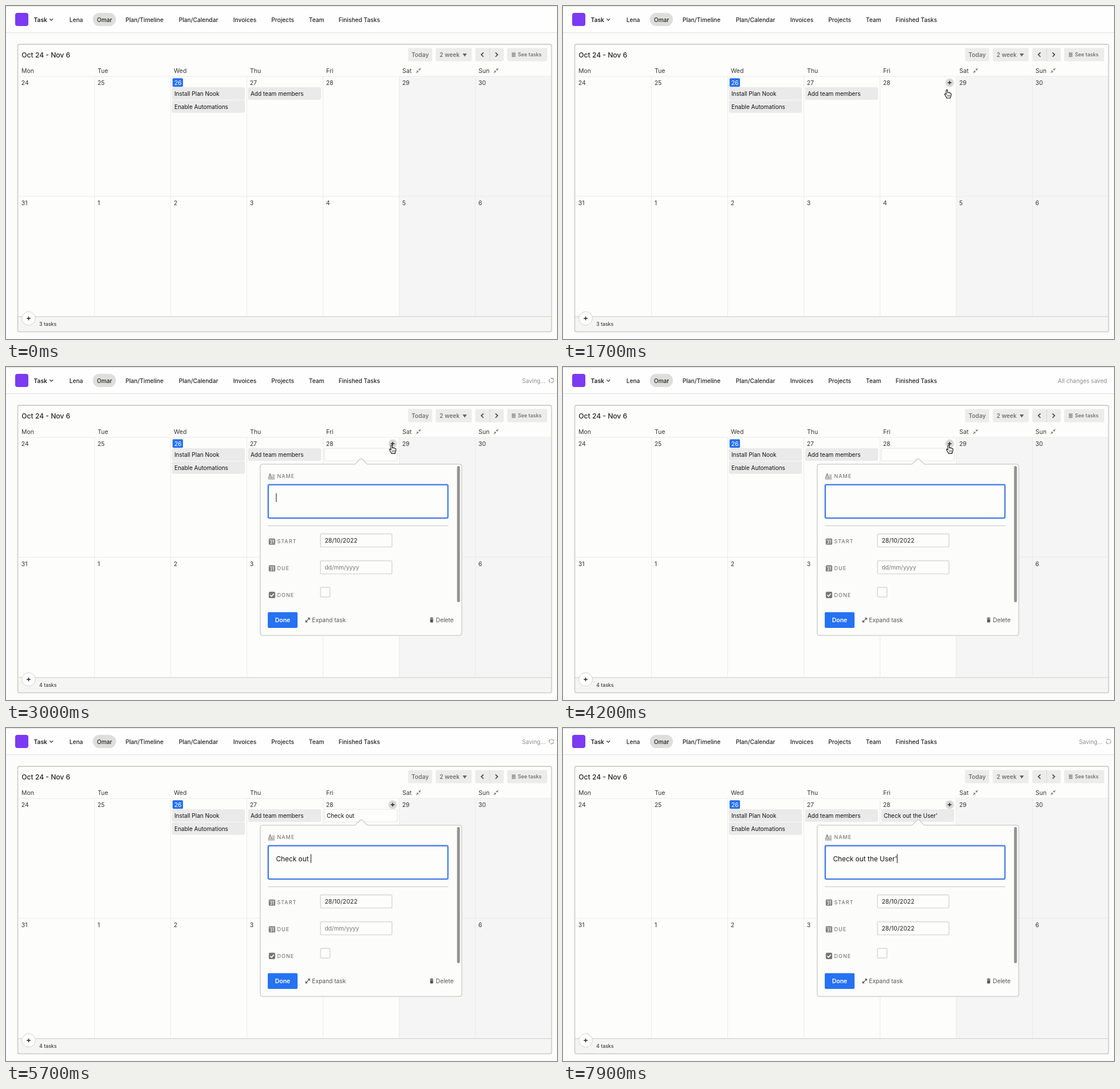
Write an HTML page that moves like this. It is 962 px wide and 582 px high and loops after 8000 ms.

```html
<!DOCTYPE html>
<html lang="en">
<head>
<meta charset="utf-8">
<title>Task calendar</title>
<style>
html, body { margin: 0; width: 100%; height: 100%; overflow: hidden; background: #fcfcfb; }
svg { display: block; width: 962px; height: 582px; }
text { font-family: Inter, "Open Sans", sans-serif; white-space: pre; }
</style>
</head>
<body>
<svg id="stage" viewBox="0 0 962 582" xmlns="http://www.w3.org/2000/svg"></svg>
<script>
const NS = 'http://www.w3.org/2000/svg';
const stage = document.getElementById('stage');
let layer = stage;

function add(tag, attrs, parent = layer) {
  const el = document.createElementNS(NS, tag);
  for (const k in attrs) el.setAttribute(k, attrs[k]);
  parent.appendChild(el);
  return el;
}
function group(attrs = {}) {
  layer = add('g', attrs, stage);
  return layer;
}
function box(x, y, w, h, fill, r = 0, stroke = 'none', sw = 1) {
  return add('rect', { x, y, width: w, height: h, rx: r, fill, stroke, 'stroke-width': sw });
}
function label(x, y, str, size, fill = '#222', weight = 400, more = {}) {
  const el = add('text', { x, y, 'font-size': size, fill, 'font-weight': weight, ...more });
  el.textContent = str;
  return el;
}
const mid = (x, y, str, size, fill, weight) =>
  label(x, y, str, size, fill, weight, { 'text-anchor': 'middle' });
function line(d, stroke, sw = 1) {
  return add('path', { d, stroke, 'stroke-width': sw, fill: 'none' });
}
function plus(x, y, r = 3.3) {
  line(`M${x - r} ${y}h${2 * r}M${x} ${y - r}v${2 * r}`, '#222', 1.4);
}
// Two arrow heads on a diagonal: pointing inward or outward
function diagonal(x, y, s, color, inward) {
  const g = add('g', { transform: `translate(${x} ${y})`, stroke: color, 'stroke-width': 1.1, fill: color });
  add('path', { d: `M${-s} ${s}L${s} ${-s}`, 'stroke-dasharray': inward ? `${s} ${s * 0.83} ${s}` : 'none' }, g);
  const a = inward ? 0.7 : s, b = inward ? s * 0.85 : s * 0.1;
  add('path', { d: `M${a} ${-a}L${a} ${-b}L${b} ${-a}ZM${-a} ${a}L${-a} ${b}L${-b} ${a}Z`, 'stroke-width': 0.5 }, g);
}

function drawNav() {
  box(0, 0, 962, 46, '#fefefe');
  line('M0 .5H962', '#dadada');
  line('M0 46.5H962', '#dfe1e7');
  box(16, 12, 23, 23, '#7c3af2', 4);
  label(48.6, 27.7, 'Task', 10.2, '#222', 600);
  line('M76.3 22.3l2.9 2.8 2.9-2.8', '#333', 1.2);
  box(151.5, 12, 40.5, 23, '#dededc', 11.5);
  [['Lena', 122.5], ['Omar', 172], ['Plan/Timeline', 241.8], ['Plan/Calendar', 336],
   ['Invoices', 417], ['Projects', 483.2], ['Team', 542.2], ['Finished Tasks', 616.8]]
    .forEach(([s, x]) => mid(x, 27.7, s, 10.2, '#222', 500));
}

const colX = i => 21.5 + 133 * i;
const ROWS = [123, 332.5, 542.5];

function item(col, row, str) {
  const x = colX(col) + 2.2, y = 142 + 22.7 * row;
  const bg = box(x, y, 127.5, 22, '#eaeaea', 3);
  return { bg, text: label(x + 4.2, y + 15.3, str, 10, '#111') };
}

function drawCalendar() {
  box(21, 67.5, 931, 502, '#fdfdfc', 3);
  box(686.5, 123, 265, 420, '#f5f5f5');
  box(21, 543, 931, 26, '#f5f5f4');
  label(27.3, 89.8, 'Oct 24 - Nov 6', 12.1, '#222', 500);

  box(702, 73.5, 42, 23, '#ececeb', 2);
  mid(723, 89, 'Today', 10.3, '#666', 500);
  box(750.5, 73.5, 62.5, 23, '#ececeb', 2);
  label(757, 89, '2 week', 10.2, '#666', 500);
  add('path', { d: 'M797.2 83h7.4l-3.7 5.5z', fill: '#666' });
  box(819.5, 73.5, 49.5, 23, '#ececeb', 2);
  line('M844.5 73.5v23', '#dadada');
  line('M833.6 81.4l-3.8 3.7 3.8 3.7M854.6 81.4l3.8 3.7-3.8 3.7', '#444', 1.6);
  box(875, 73.5, 70, 23, '#ececeb', 2);
  line('M883 82h6.6M883 84.1h6.6M883 86.2h6.6M883 88.3h6.6', '#666', 1.1);
  label(893.8, 88.4, 'See tasks', 8.9, '#666', 500);

  let grid = '';
  for (let i = 1; i < 7; i++) grid += `M${colX(i)} 123V542`;
  line(grid + ROWS.slice(0, 2).map(y => `M21 ${y}H952`).join(''), '#ebebea');
  line('M21 542.8H952', '#d9d9d8', 1.4);

  ['Mon', 'Tue', 'Wed', 'Thu', 'Fri', 'Sat', 'Sun'].forEach((d, i) => {
    label(colX(i) + 5.5, 116.5, d, 10.5, '#333');
    const today = i === 2;
    if (today) box(290.8, 126.3, 18.2, 15, '#2470ee', 2);
    label(colX(i) + (today ? 6.2 : 5.2), 137.8, 24 + i, 10.5, today ? '#fff' : '#333');
    label(colX(i) + 5.2, 347.6, i ? i : 31, 10.5, '#333');
  });
  diagonal(720.3, 112.8, 4, '#777', true);
  diagonal(855.7, 112.8, 4, '#777', true);

  item(2, 0, 'Install Plan Nook');
  item(2, 1, 'Enable Automations');
  item(3, 0, 'Add team members');

  box(20.5, 67, 932, 502.3, 'none', 3, '#d0d0cc', 1.8);
  add('circle', { cx: 39.5, cy: 546, r: 11.8, fill: '#fefefe', stroke: '#d2d2d0' });
  plus(39.5, 546);
}

function dateIcon(y) {
  box(458.8, y - 5, 11.2, 10.8, '#777', 1.5);
  line(`M460 ${y - 2.7}h8.8`, '#fcfcfb', 0.8);
  mid(464.4, y + 4.4, '31', 7, '#fff', 700);
}
const fieldName = (y, s) =>
  label(473.4, y + 3.3, s, 9, '#666', 400, { 'letter-spacing': 1.1 });

function drawPopup() {
  const top = 'M448 169.8H609.5L618 161.2Q620 159.4 622 161.2L630.5 169.8';
  add('path', {
    d: top + 'H791Q795.7 169.8 795.7 174.5V464.5Q795.7 469.2 791 469.2H448.5' +
      'Q443.8 469.2 443.8 464.5V174.5Q443.8 169.8 448.5 169.8Z',
    fill: '#fcfcfb', stroke: '#d2d2d1', 'stroke-width': 1.6
  });
  box(787.5, 173, 5, 238, '#929292', 2.5);

  mid(461.2, 193, 'A', 9, '#666', 500);
  line('M464.8 188.8h4.4M464.8 191.2h4.4M457.5 193.6h11.7M457.5 195.8h11.7', '#777', 1);
  fieldName(190.8, 'NAME');
  box(457.2, 205, 315, 59.6, 'none', 2.5, '#bcd2f8', 2.4);
  box(458, 205.8, 313.4, 58, '#fdfdfc', 2, '#2f6fe4', 1.8);
  line('M457 277.5H772', '#c6c6c5');

  dateIcon(304.7);
  fieldName(304.7, 'START');
  dateIcon(351.5);
  fieldName(351.5, 'DUE');
  box(458.8, 392.8, 11.2, 11.2, '#777', 2);
  line('M461.3 398.5l2.3 2.3 4-4.4', '#fff', 1.6);
  fieldName(398.5, 'DONE');

  box(549, 291.7, 124.8, 22.8, '#fdfdfc', 2, '#dcdcdb', 1.7);
  label(556.4, 306.9, '28/10/2022', 10.5, '#222');
  box(549, 338.7, 124.8, 22.8, '#fdfdfc', 2, '#dcdcdb', 1.7);
  box(549, 385.3, 16.6, 16.8, '#fdfdfc', 2, '#d6d6d5', 1.5);

  box(457, 428.5, 52, 27.5, '#2572f2', 2);
  mid(483, 446.2, 'Done', 10.5, '#fff', 600);
  diagonal(526.7, 442.3, 3.7, '#555', false);
  label(534.3, 446, 'Expand task', 10.2, '#555');
  add('path', { d: 'M740 438.6h2v-1h2.2v1h2v1.2h-6.2zM740.5 440.4h5.2v5.2q0 1-1 1h-3.2q-1 0-1-1z', fill: '#555' });
  label(750.6, 446, 'Delete', 10.2, '#555');
}

drawNav();
drawCalendar();
const count = label(58, 558.9, '3 tasks', 8.9, '#222');

const saved = group();
label(950, 27.6, 'All changes saved', 10, '#8c8c8c', 400, { 'text-anchor': 'end' });

const saving = group();
label(901, 27.6, 'Saving...', 10, '#8c8c8c');
const spinner = add('circle', {
  r: 4, fill: 'none', stroke: '#888', 'stroke-width': 1.1, 'stroke-dasharray': '6.6 1.78'
});

const hover = group();
const halo = add('circle', { cx: 675, cy: 134, r: 7.5, fill: '#d9d9d8' });
plus(675, 134);

const entry = group();
const task = item(4, 0, '');
task.bg.setAttribute('stroke-width', 1.2);

const popup = group();
drawPopup();
const due = label(556.4, 353.9, '', 10.1);
const typed = label(471.4, 233, '', 11.85, '#111');
const caret = box(0, 220.5, 1, 15.5, '#111');

const arrow = group();
add('path', {
  d: 'M0 0V12L2.8 9.4L4.7 13.7L6.9 12.7L5 8.6H8.7Z',
  fill: '#111', stroke: '#fff', 'stroke-width': 0.9, 'stroke-linejoin': 'round'
});
const hand = group();
add('path', {
  d: 'M-2.9 1.7V-5.4Q-2.9 -6.8 -1.7 -6.8T-.5 -5.4V-1.8Q.8 -2.7 1.6 -1.5Q3 -2.2 3.7 -1' +
    'Q5.6 -1.4 5.7 .6V3Q5.7 5 4.4 6.2V7.8H-2.1V6.6Q-3.7 5 -4.9 2.6Q-6 .8 -5 .2Q-4 -.2 -2.9 1.7Z',
  fill: '#fff', stroke: '#111', 'stroke-width': 1.1, 'stroke-linejoin': 'round'
});
line('M-.4 2v3.3M1.6 2v3.3M3.5 2v3.3', '#111', 0.7);

const LOOP = 8000, APPEAR = 500, OVER = 1700, CLICK = 2700, SAVED = 3700, TYPE = 4500, DUE = 7700;
const PHRASE = "Check out the User'";
// [time, characters typed by then]
const KEYS = [[TYPE - 110, 0], [5600, 10], [6100, 10], [6700, 13], [7000, 14], [7150, 14], [7800, 19]];
// [time, x, y] of the pointer
const MOVES = [[APPEAR, 598, 292], [1100, 652, 202], [1250, 653, 200], [1850, 673, 137]];

const show = (el, on) => el.setAttribute('visibility', on ? 'visible' : 'hidden');
const ease = u => u * u * (3 - 2 * u);

function along(points, t, k, curve = u => u) {
  if (t <= points[0][0]) return points[0][k];
  for (let i = 1; i < points.length; i++) {
    const a = points[i - 1], b = points[i];
    if (t < b[0]) return a[k] + (b[k] - a[k]) * curve((t - a[0]) / (b[0] - a[0]));
  }
  return points[points.length - 1][k];
}

function draw(t) {
  const open = t >= CLICK, over = t >= OVER, typing = t >= TYPE, dated = t >= DUE;
  const x = along(MOVES, t, 1, ease), y = along(MOVES, t, 2, ease);
  arrow.setAttribute('transform', `translate(${x} ${y})`);
  hand.setAttribute('transform', `translate(${x + 2} ${y + 6.3})`);
  show(arrow, t >= APPEAR && !over);
  show(hand, over && !typing);
  show(hover, t >= APPEAR);
  show(halo, over);

  count.textContent = open ? '4 tasks' : '3 tasks';
  show(saving, open && t < SAVED || typing);
  show(saved, t >= SAVED && !typing);
  spinner.setAttribute('transform', `translate(952.3 23.6) rotate(${t * 0.36 % 360})`);

  const str = PHRASE.slice(0, Math.floor(along(KEYS, t, 1) + 1e-6));
  show(entry, open);
  task.text.textContent = str;
  task.bg.setAttribute('fill', dated ? '#eaeaea' : '#fdfdfc');
  task.bg.setAttribute('stroke', dated ? 'none' : '#e6e6e5');

  show(popup, open);
  due.textContent = dated ? '28/10/2022' : 'dd/mm/yyyy';
  due.setAttribute('font-size', dated ? 10.5 : 10.1);
  due.setAttribute('fill', dated ? '#222' : '#777');
  typed.textContent = str;
  caret.setAttribute('x', 471.4 + (str ? typed.getComputedTextLength() : 0));
  show(caret, open && (typing || (t - CLICK) % 1000 < 500 && t < SAVED));
}

function tick() {
  const t = performance.now() % LOOP;
  draw(Math.floor(t / 100) * 100);
  requestAnimationFrame(tick);
}
tick();
</script>
</body>
</html>
```
